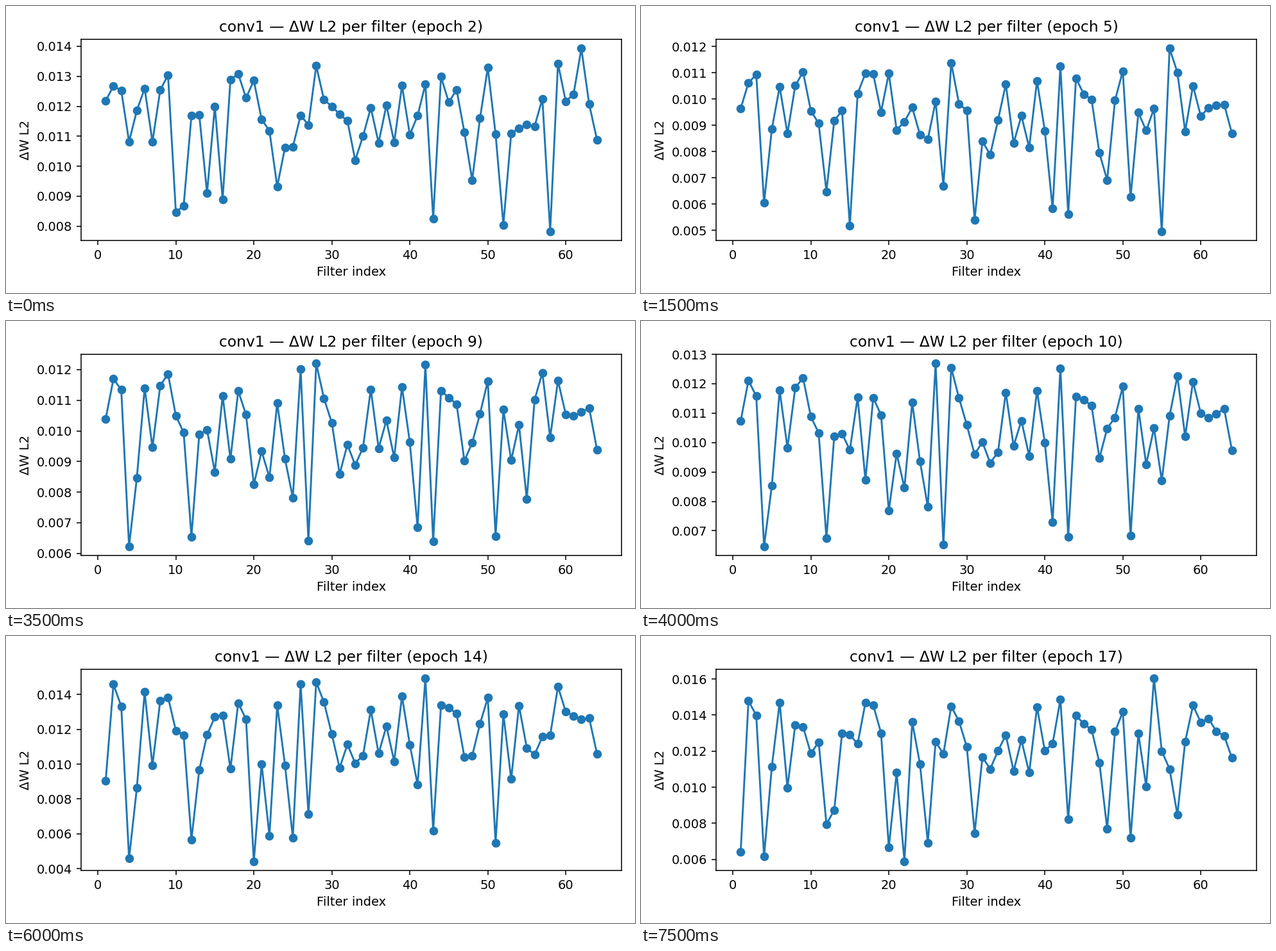
A matplotlib script that plays this animation: 980 by 448 pixels, repeating every 8000 ms.

```python
import numpy as np
import matplotlib.pyplot as plt
from matplotlib.animation import FuncAnimation

plt.rcParams["font.family"] = "DejaVu Sans"

WIDTH, HEIGHT, DPI = 980, 448, 140
FIRST, LAST = 2, 17
FILTERS = 64
index = np.arange(1, FILTERS + 1)

# Key epochs: the top filter, then the weak filters, deepest first.
POSES = {
    2: (62, [58, 52, 43, 10, 11, 16, 14, 23, 48]),
    5: (56, [55, 15, 31, 43, 41, 4, 51, 12, 27, 48]),
    12: (26, [20, 27, 4, 12, 51, 43, 25, 17, 41, 22, 5]),
    17: (54, [22, 4, 1, 20, 25, 51, 31, 48, 12, 43, 57, 13]),
}

# Epoch with its lowest and highest value, in units of 1e-5.
RANGE = np.array([
    (2, 783, 1393), (5, 496, 1193), (7, 574, 1123), (10, 647, 1269),
    (12, 669, 1360), (14, 442, 1492), (17, 589, 1603)])

rng = np.random.default_rng(7)
steady = rng.uniform(0.48, 0.9, FILTERS)


def pose(peak, dips):
    shape = steady + rng.uniform(-0.1, 0.06, FILTERS)
    shape[np.array(dips) - 1] = np.linspace(0, 0.28, len(dips))
    shape[peak - 1] = 1
    return shape


keys = list(POSES)
shapes = np.array([pose(*POSES[k]) for k in keys])


def profile(epoch):
    shape = np.array([np.interp(epoch, keys, col) for col in shapes.T])
    shape = (shape - shape.min()) / np.ptp(shape)
    low, high = (np.interp(epoch, RANGE[:, 0], RANGE[:, k]) for k in (1, 2))
    return (low + (high - low) * shape) * 1e-5


def heading(epoch):
    return f"conv1 — ΔW L2 per filter (epoch {epoch})"


fig, ax = plt.subplots(figsize=(WIDTH / DPI, HEIGHT / DPI), dpi=DPI)
fig.subplots_adjust(left=117 / WIDTH, right=959 / WIDTH,
                    bottom=1 - 366 / HEIGHT, top=1 - 52 / HEIGHT)
line, = ax.plot(index, profile(FIRST), marker="o")
ax.set_xlabel("Filter index")
ax.set_ylabel("ΔW L2")
title = ax.set_title(heading(FIRST))


def update(step):
    epoch = FIRST + step
    line.set_ydata(profile(epoch))
    ax.relim()
    ax.autoscale_view()
    title.set_text(heading(epoch))
    return line, title


anim = FuncAnimation(fig, update, frames=LAST - FIRST + 1, interval=500,
                     repeat=True, repeat_delay=0, blit=False)
plt.show()
```
